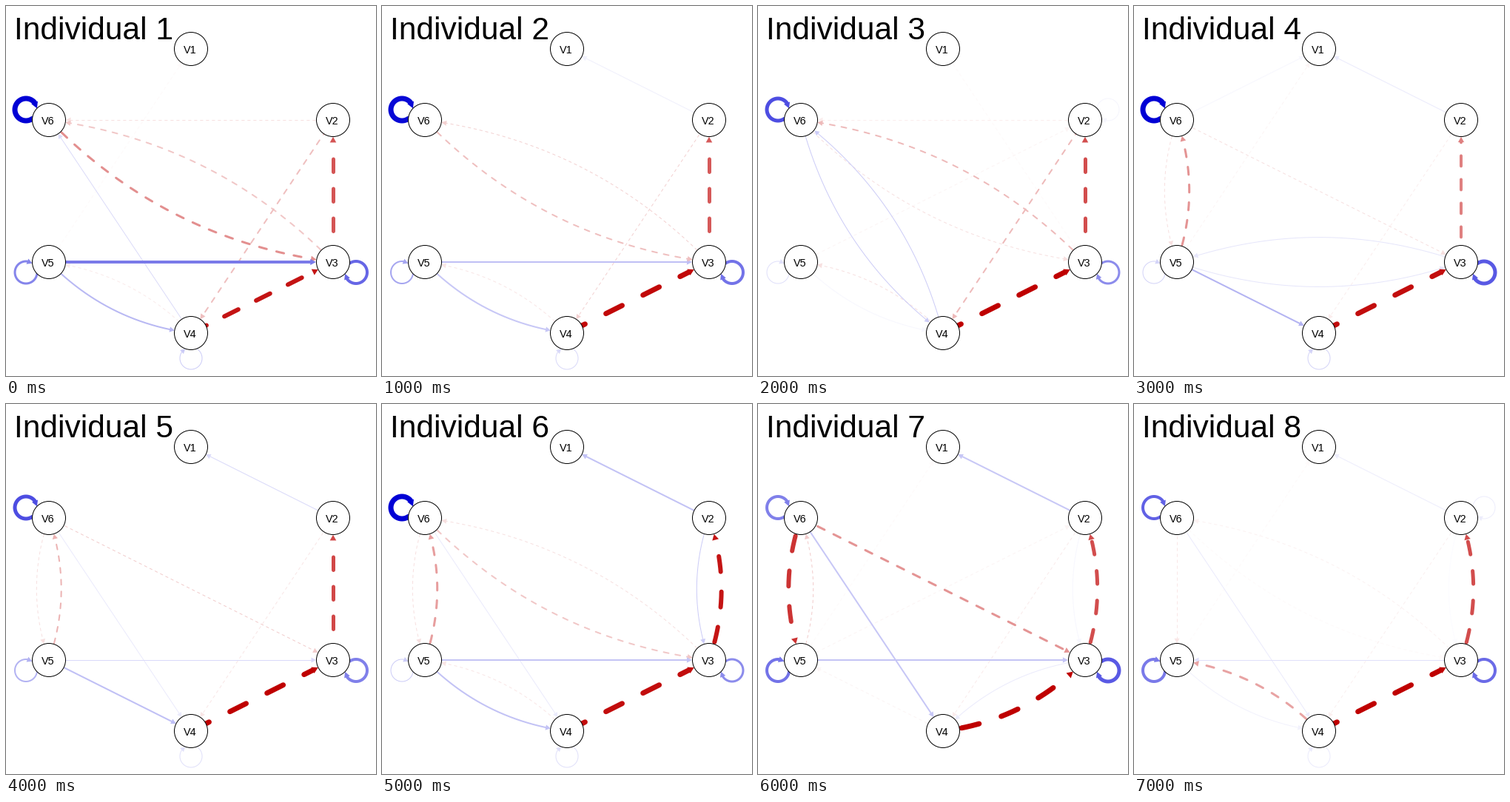
Recreate the animation shown at these times as a matplotlib script. Size 500 px wide and 500 px high, loop 8 s.

```python
import numpy as np
import matplotlib.pyplot as plt
from matplotlib.animation import FuncAnimation
from matplotlib.patches import Circle, Polygon

SIZE, DPI = 500, 100
PX = 72 / DPI
RADIUS, LOOP_RADIUS = 22.5, 15
BEND = 0.087
BLUE, RED = np.array([0, 0, 0xD5]) / 255, np.array([0xBF, 0, 0]) / 255

NODES = {
    "1": (250, 58), "2": (442, 154), "3": (442, 346),
    "4": (250, 442), "5": (58, 346), "6": (58, 154),
}
# Offset of each self-loop's centre from its node.
LOOPS = {
    "2": (31, -14), "3": (31, 14), "4": (0, 34),
    "5": (-31, 14), "6": (-31, -14),
}
# Key: source and destination node. Value: strength, negative is red and dashed.
NETWORKS = [
    {"66": 1, "55": .48, "33": .6, "44": .2, "53": .52, "43": -.92,
     "32": -.67, "63": -.44, "36": -.22, "24": -.25, "26": -.12, "46": .14,
     "54": .28, "45": -.08, "51": -.02},
    {"66": .97, "55": .35, "33": .55, "44": .15, "53": .25, "43": -.97,
     "32": -.65, "63": -.25, "36": -.18, "24": -.18, "54": .22, "45": -.1,
     "21": .06},
    {"66": .7, "55": .12, "33": .45, "22": .04, "43": -1, "32": -.7,
     "36": -.27, "63": -.12, "24": -.27, "46": .2, "64": .2, "45": -.12,
     "54": .03, "26": -.07, "13": -.02, "52": -.04},
    {"66": 1, "55": .17, "33": .65, "44": .17, "43": -.95, "32": -.5,
     "56": -.42, "65": -.12, "54": .3, "63": -.12, "35": .1, "53": .1,
     "24": -.07, "21": .08, "61": .03, "51": -.04},
    {"66": .7, "55": .3, "33": .5, "44": .12, "43": -1, "32": -.72,
     "56": -.3, "65": -.12, "54": .25, "63": -.2, "53": .15, "24": -.1,
     "21": .15, "64": .08},
    {"66": 1, "55": .2, "33": .45, "44": .12, "43": -.95, "32": -.92,
     "23": .2, "21": .24, "56": -.38, "65": -.12, "63": -.22, "36": -.12,
     "53": .23, "54": .24, "45": -.1, "64": .08},
    {"66": .5, "55": .55, "33": .65, "43": -1, "34": .08, "32": -.7,
     "23": .03, "65": -.8, "56": -.2, "63": -.42, "64": .22, "53": .23,
     "21": .22, "24": -.08, "52": -.04, "51": -.02, "45": -.04},
    {"66": .62, "55": .52, "33": .58, "22": .07, "44": .08, "43": -1,
     "32": -.7, "23": .01, "45": -.36, "54": .05, "21": .07, "65": -.1,
     "35": .12, "64": .08, "24": -.06, "36": -.05, "63": -.02, "51": -.02},
]

fig = plt.figure(figsize=(SIZE / DPI, SIZE / DPI), dpi=DPI, facecolor="white")
ax = fig.add_axes([0, 0, 1, 1])
ax.set_xlim(0, SIZE)
ax.set_ylim(SIZE, 0)
ax.axis("off")


def distance(pts, point):
    return np.hypot(*(pts - point).T)


def loop_path(node):
    offset = np.array(LOOPS[node])
    centre = np.array(NODES[node]) + offset
    dist = np.hypot(*offset)
    reach = (dist**2 + LOOP_RADIUS**2 - RADIUS**2) / (2 * dist)
    half = np.arccos(reach / LOOP_RADIUS)
    inward = np.arctan2(-offset[1], -offset[0])
    t = np.linspace(inward + half, inward + 2 * np.pi - half, 120)
    return centre + LOOP_RADIUS * np.column_stack([np.cos(t), np.sin(t)])


def link_path(src, dst, curved):
    a, b = np.array(NODES[src]), np.array(NODES[dst])
    d = b - a
    t = np.linspace(0, 1, 600)[:, None]
    bulge = 4 * BEND * t * (1 - t) if curved else 0
    pts = a + d * t + bulge * np.array([-d[1], d[0]])
    keep = distance(pts, b) >= RADIUS
    if curved:  # straight links start at the centre, behind the node
        keep &= distance(pts, a) >= RADIUS
    return pts[keep]


def draw_arrow(pts, strength):
    a = abs(strength)
    width = max(1, round(7 * a))
    color = 1 - a + a * (BLUE if strength > 0 else RED)
    length, half = 6 + 0.3 * width, 3.3 + 0.2 * width

    tip = pts[-1]
    end = np.flatnonzero(distance(pts, tip) >= length)[-1]
    base = pts[end]
    u = (tip - base) / np.hypot(*(tip - base))
    side = half * np.array([-u[1], u[0]])

    style = "-" if strength > 0 else (7.6, (3.5, 4.5))
    line, = ax.plot(*pts[:end + 1].T, color=color, lw=width * PX, ls=style,
                    solid_capstyle="round", dash_capstyle="round",
                    zorder=1 + a)
    head = Polygon([tip, base + side, base - side], facecolor=color,
                   edgecolor="none", zorder=1 + a)
    ax.add_patch(head)
    return [line, head]


for name, (x, y) in NODES.items():
    ax.add_patch(Circle((x, y), RADIUS, facecolor="white", edgecolor="black",
                        lw=PX, zorder=5))
    ax.text(x - 1, y + 6, "V" + name, family="Liberation Sans",
            size=14.4 * PX, ha="center", va="baseline", zorder=6)

title = ax.text(11, 45, "", family="Liberation Sans", size=42.5 * PX,
                ha="left", va="baseline", zorder=6)
drawn = []


def update(i):
    while drawn:
        drawn.pop().remove()
    title.set_text(f"Individual {i + 1}")
    net = NETWORKS[i]
    for (src, dst), strength in net.items():
        if src == dst:
            pts = loop_path(src)
        else:
            pts = link_path(src, dst, curved=dst + src in net)
        drawn.extend(draw_arrow(pts, strength))
    return drawn + [title]


anim = FuncAnimation(fig, update, frames=len(NETWORKS), interval=1000,
                     init_func=lambda: [], repeat=True, repeat_delay=0,
                     blit=False)
plt.show()
```
